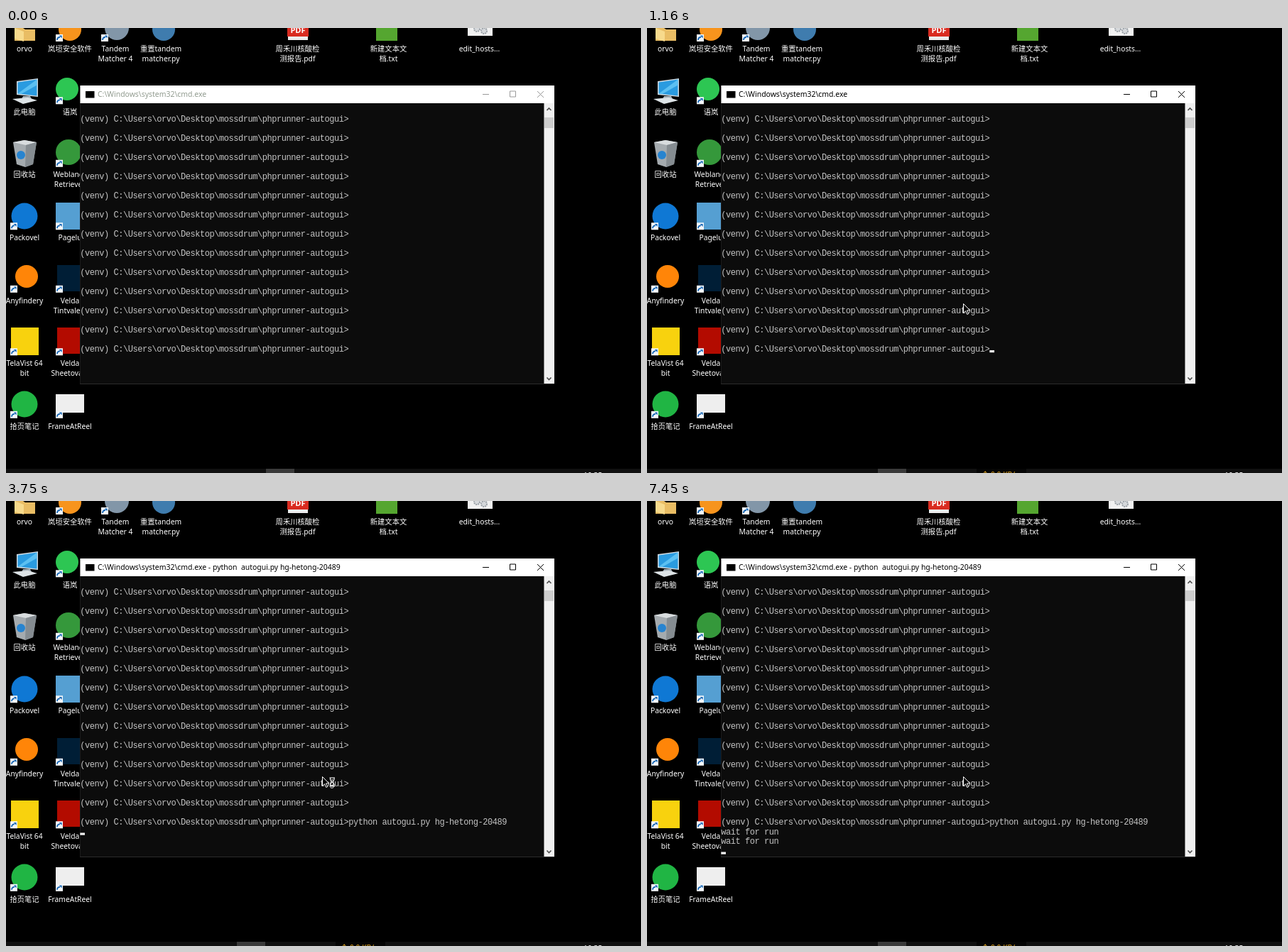
Recreate the animation shown at these times as an HTML page. Size 894x627 px, loop 8 s.

```html
<!DOCTYPE html>
<html lang="zh">
<head>
<meta charset="utf-8">
<title>Command prompt</title>
<style>
html, body { margin: 0; width: 100%; height: 100%; overflow: hidden; background: #000; }
svg { display: block; width: 894px; height: 627px; }
text { white-space: pre; font: 10.3px "Noto Sans", "Noto Sans CJK SC", sans-serif; }
.label { fill: #fff; text-anchor: middle; }
.title { font-size: 10.45px; }
.term { fill: #c4c4c4; font: 12px "Liberation Mono", monospace; letter-spacing: -0.45px; }
</style>
</head>
<body>
<svg id="stage" viewBox="0 0 894 627" xmlns="http://www.w3.org/2000/svg"></svg>
<script>
const LOOP = 8000;
const stage = document.getElementById('stage');

function add(tag, attrs, content) {
  const el = document.createElementNS('http://www.w3.org/2000/svg', tag);
  for (const k in attrs) el.setAttribute(k, attrs[k]);
  if (content !== undefined) el.textContent = content;
  stage.appendChild(el);
  return el;
}
const rect = (x, y, width, height, fill) => add('rect', { x, y, width, height, fill });
const circle = (cx, cy, r, fill) => add('circle', { cx, cy, r, fill });
const path = (d, fill, stroke = 'none', width = 1) =>
  add('path', { d, fill, stroke, 'stroke-width': width });
const text = (x, y, content, cls, fill) => {
  const el = add('text', { x, y, class: cls }, content);
  if (fill) el.setAttribute('fill', fill);
  return el;
};
const show = (el, on) => el.setAttribute('visibility', on ? 'visible' : 'hidden');
const setText = (el, s) => { if (el.textContent !== s) el.textContent = s; };

// Value of the last [time, ...value] entry that has begun
function at(list, t) {
  let found = list[0];
  for (const item of list) if (item[0] <= t) found = item;
  return found;
}

function label(x, y, ...lines) {
  lines.forEach((s, i) => text(x, y + i * 14.3, s, 'label'));
}

function shortcut(x, y) {
  rect(x, y, 10, 10, '#f4f8fb');
  path(`M${x + 2} ${y + 8}q0 -4 4 -4`, 'none', '#1565b5', 1.8);
  path(`M${x + 4.6} ${y + 1.6}h4v4z`, '#1565b5');
}

// Desktop, top row
path('M12 0h12l3 2h14v16h-29z', '#e9bd64');
path('M12 0l13 5v14l-13 -4z', '#f7da8c');
label(26, 33, 'orvo');
circle(90, 2, 16, '#f7941d');
shortcut(70, 9);
label(90, 33, '岚垣安全软件');
circle(156, 0, 17, '#8296a8');
shortcut(134, 9);
label(154, 33, 'Tandem', 'Matcher 4');
circle(222, 2, 16, '#3f7cae');
label(218, 33, '重置tandem', 'matcher.py');
rect(397, 0, 28, 17, '#ececec');
rect(396, 0, 30, 12, '#d92b20');
add('text', { x: 411, y: 7, class: 'label', style: 'font-weight:700;font-size:11px' }, 'PDF');
label(410.5, 33, '周禾川核酸检', '测报告.pdf');
rect(521, 0, 30, 18, '#55a630');
label(538.5, 33, '新建文本文', '档.txt');
rect(650, 0, 35, 11, '#f1f1f1');
for (const [x, y, r] of [[663, 1, 4], [673, 4, 4]]) {
  add('circle', { cx: x, cy: y, r, fill: '#d5d8db', stroke: '#9ca2a8', 'stroke-width': 2, 'stroke-dasharray': '2 1' });
}
label(666.5, 33, 'edit_hosts...');

// System icons
path('M15 75l30 -4v26l-30 -3z', '#cfd9e0');
path('M16.5 76.5l27 -4v23l-27 -3z', '#2a9be0');
path('M16.5 92.5l27 -20v8l-22 12.5z', '#5cc0f2');
path('M24 96h10l2 4h-14z', '#a5b0b8');
path('M9 100l22 -2 13 4 -20 5z', '#dde3e6');
label(26, 122, '此电脑');
path('M10 161l16 -3 17 3 -5 31 -11 4 -12 -4z', '#a5abaf');
path('M10 161l16 -3 17 3 -15 4z', '#d8dcde');
path('M28 165l15 -4 -5 31 -11 4z', '#858c91');
circle(21, 179, 6, '#2784d0');
label(26, 210, '回收站');

// Application icons
circle(26, 265, 18.5, '#0f78d4');
circle(29, 350, 16, '#ff8508');
rect(7, 422, 39, 39, '#f8d20e');
circle(26, 530, 18.5, '#20b544');
circle(86, 86, 16, '#2dc653');
circle(88, 175, 18, '#35983b');
rect(70, 246, 39, 38, '#559fd2');
rect(72, 334, 38, 37, '#001e36');
rect(72, 422, 38, 37, '#b30b00');
rect(70, 516, 40, 26, '#eeeeee');
for (const row of [1, 2, 3, 4, 5, 6]) {
  const y = 8.8 + row * 88.5;
  if (row > 2) shortcut(6, y);
  shortcut(70, y);
}
label(26, 299, 'Packovel');
label(26, 388, 'Anyfindery');
label(26, 476, 'TelaVist 64', 'bit');
label(26, 565, '拾页笔记');
label(90, 122, '语岚');
label(90, 210, 'Weblanes', 'Retrieves');
label(90, 299, 'Pagelu');
label(90, 388, 'Velda', 'Tintvale X');
label(90, 476, 'Velda', 'Sheetova X');
label(90, 565, 'FrameAtReel');

// Taskbar
rect(0, 621, 894, 6, '#101010');
const task = rect(366, 621, 40, 6, '#3a3a3a');
const meter = rect(464, 621, 70, 6, '#050505');
const speed = text(471, 633, '', '', '#e5a51c');
text(813, 633.5, '10:35', '', '#fff');

// Console window
rect(104, 81, 668, 421, '#2c2c2c');
rect(104.5, 81, 667.5, 25, '#fff');
rect(104.5, 106, 653, 395, '#0c0c0c');
rect(757.5, 106, 14.5, 395, '#f0f0f0');
rect(758, 126, 13, 15, '#cdcdcd');
path('M761.5 116l3 -3 3 3M761.5 492.5l3 3 3 -3', 'none', '#505050', 1.6);
rect(112, 89, 12.5, 9.5, '#000');
const title = text(129, 97.3, '', 'title');
const controls = path('M671 93.5h9M709.5 89h8v8h-8zM748 89l9 9M757 89l-9 9', 'none', '#000');

const LEFT = 104.3, CHAR = 6.75, LINE = 13.5, BASE = 456;
const prompt = '(venv) C:\\Users\\orvo\\Desktop\\mossdrum\\phprunner-autogui>';
const command = 'python autogui.py hg-hetong-20489';
const afterPrompt = LEFT + prompt.length * CHAR;
const afterCommand = afterPrompt + command.length * CHAR;
for (let i = 0; i < 13; i++) text(LEFT, 132 + i * LINE * 2, prompt, 'term');
const typed = text(afterPrompt, BASE, command, 'term');
const waits = [1, 2].map(n => text(LEFT, BASE + n * LINE, 'wait for run', 'term'));
const caret = rect(0, 0, 6.7, 3.2, '#f2f2f2');

// Pointer and busy glass
const pointer = path('M.5 .5v13l3 -2.8 2.2 4.8 2 -.9 -2.2 -4.7h4.2z', '#000', '#fff');
const glass = path('M455.5 390h7.5M455.5 402h7.5M456.5 390v2.5l2.2 3.5 -2.2 3.5v2.5M462 390v2.5l-2.2 3.5 2.2 3.5v2.5M458 393h2.5M457.5 400.5h3.5', 'none', '#fff', 1.1);

const ACTIVE = 580;
const moves = [[120, 845, 612], [200, 715, 520], [280, 530, 428], [360, 445, 398],
  [440, 445, 395], [510, 445, 392], [640, 445, 390], [700, 445, 388]];
// [time, visible, x, line]
const carets = [[0, 0, 0, 0], [1160, 1, afterPrompt, 0], [1570, 1, afterCommand, 0],
  [1630, 0, 0, 0], [2690, 1, LEFT, 1], [3220, 0, LEFT, 1], [3750, 1, LEFT, 1],
  [4270, 0, LEFT, 1], [4810, 1, LEFT, 1], [5060, 1, LEFT, 2], [5860, 0, LEFT, 2],
  [6380, 1, LEFT, 2], [6930, 0, LEFT, 2], [7450, 1, LEFT, 3]];
const busy = [[2490, 2950], [3030, 3490], [3550, 3940], [4000, 4870], [4990, 5520]];
const speeds = [[0, '↑ 10.3 KB/s'], [850, '↑ 0.0 KB/s'], [4930, '↑ 0.5 KB/s'],
  [5860, '↑ 1.0 KB/s'], [6860, '↑ 0.0 KB/s']];

function render(t) {
  const active = t >= ACTIVE;
  const shell = 'C:\\Windows\\system32\\cmd.exe';
  setText(title, t < 2160 ? shell : `${shell} - python  autogui.py hg-hetong-20489`);
  title.setAttribute('fill', active ? '#000' : '#929c90');
  controls.setAttribute('stroke', active ? '#000' : '#999');
  task.setAttribute('x', active ? 325 : 366);
  show(meter, active);
  show(speed, active);
  setText(speed, at(speeds, t)[1]);

  show(typed, t >= 1570);
  show(waits[0], t >= 5060);
  show(waits[1], t >= 7450);

  const [, on, x, line] = at(carets, t);
  show(caret, on);
  caret.setAttribute('x', x);
  caret.setAttribute('y', BASE - 2 + line * LINE);

  const [, px, py] = at(moves, t);
  show(pointer, t >= 120);
  pointer.setAttribute('transform', `translate(${px} ${py})`);
  show(glass, busy.some(([a, b]) => t >= a && t < b));
}

const start = performance.now();
function tick() {
  render((performance.now() - start) % LOOP);
  requestAnimationFrame(tick);
}
tick();
</script>
</body>
</html>
```
